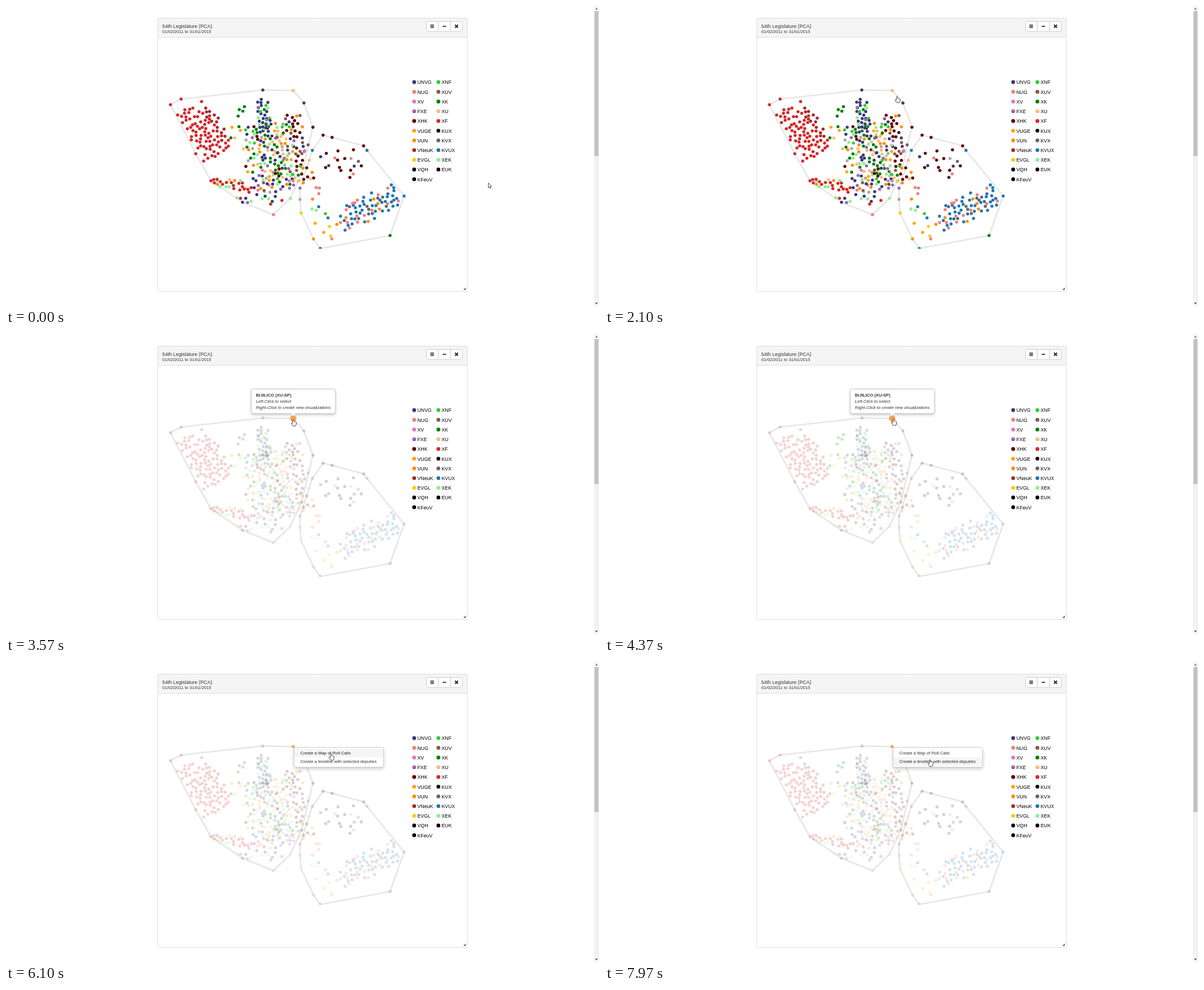
An HTML page with a canvas for the animation above (8000 ms loop, 1053x532 px).

```html
<!DOCTYPE html>
<html lang="en">
<head>
<meta charset="utf-8">
<title>Legislature scatter plot</title>
<style>
html, body { margin: 0; width: 100%; height: 100%; overflow: hidden; background: #fff; }
canvas { display: block; width: 1053px; height: 532px; }
</style>
</head>
<body>
<canvas id="stage" width="1053" height="532"></canvas>
<script>
const ctx = document.getElementById('stage').getContext('2d');
const LOOP = 8000, STEP = 1000 / 15, TAU = Math.PI * 2;
const FACE = '"Liberation Sans", Arial, sans-serif';
const SMALL = 7.67, LARGE = 8.77, DOT = 2.75, GAP = 5.2;

const color = {
  navy: '#393b79', coral: '#f08080', pink: '#e377c2', violet: '#9467bd', maroon: '#600000',
  amber: '#ffa500', orange: '#ff8c00', brown: '#a52a2a', yellow: '#ffcc00', black: '#000',
  lime: '#32cd32', umber: '#8c564b', green: '#008000', peach: '#ffbb78', red: '#d62728',
  slate: '#666', blue: '#1f77b4', mint: '#90ee90', gray: '#aaa'
};

const legend = [
  'UNVG navy, NUG coral, XV pink, FXE violet, XHK maroon, VUGE amber, VUN orange, VNeuK brown, EVGL yellow, VQH black, KFeuV black',
  'XNF lime, XUV umber, XK green, XU peach, XF red, KUX black, KVX slate, KVUX blue, XEK mint, EUK black'
].map(column => column.split(', ').map(item => item.split(' ')));

// Hull corners; each one is also a dot
const hulls = [
  { keys: 'red red navy peach navy maroon maroon mint pink navy red red',
    points: [[292,175], [311,165], [456,149], [510,150], [529,172], [545,215], [525,298],
             [505,341], [475,370], [420,348], [364,310], [337,262]] },
  { keys: 'maroon maroon maroon blue blue green blue orange yellow gray violet blue',
    points: [[563,229], [579,233], [635,248], [641,256], [707,337], [682,407], [558,430],
             [546,413], [524,367], [522,343], [522,323], [544,256]] }
];

// Groups of dots strewn around an axis, densest along it
const groups = [
  { axis: [[320,180], [376,264]], spread: 32, mix: { red: 74 } },
  { axis: [[356,180], [390,245]], spread: 12, mix: { brown: 13 } },
  { axis: [[366,312], [436,322]], spread: 11, mix: { red: 17, mint: 5, peach: 2, orange: 2 } },
  { axis: [[452,165], [462,225]], spread: 13, mix: { navy: 22, green: 5, mint: 4, violet: 3, lime: 3 } },
  { axis: [[422,178], [398,242]], spread: 12, mix: { green: 6, peach: 1, amber: 1 } },
  { axis: [[458,208], [486,328]], spread: 52,
    mix: { navy: 29, green: 26, mint: 19, peach: 18, orange: 14, violet: 12, gray: 11,
           maroon: 11, lime: 9, amber: 9, umber: 8, pink: 4, coral: 2 } },
  { axis: [[506,192], [532,312]], spread: 19, mix: { maroon: 18, umber: 8, orange: 4, navy: 4, peach: 3, pink: 1 } },
  { axis: [[408,339], [500,349]], spread: 11, mix: { navy: 4, mint: 4, red: 3, violet: 1 } },
  { axis: [[562,254], [642,290]], spread: 30, mix: { maroon: 11, navy: 3, coral: 2, gray: 1, slate: 1 } },
  { axis: [[545,322], [572,416]], spread: 34, mix: { coral: 4, orange: 2, amber: 2, yellow: 2, mint: 2, blue: 2, lime: 1 } },
  { axis: [[594,386], [694,332]], spread: 26, mix: { blue: 42, coral: 15, slate: 8, orange: 5 } }
];

let seed = 54;
function random() {
  seed = (seed * 1664525 + 1013904223) % 4294967296;
  return seed / 4294967296;
}

function outline(points) {
  const path = new Path2D();
  points.forEach(p => path.lineTo(...p));
  path.closePath();
  return path;
}

const dots = [];
function addDot(key, x, y) { dots.push({ fill: color[key], x, y, order: random() }); }

function strew([[x1, y1], [x2, y2]], spread) {
  const dx = x2 - x1, dy = y2 - y1;
  const u = random(), off = (random() - random()) * spread / Math.hypot(dx, dy);
  return [x1 + dx * u - dy * off, y1 + dy * u + dx * off];
}

const isFree = ([x, y]) => hulls.some(h => ctx.isPointInPath(h.path, x, y)) &&
  dots.every(d => Math.hypot(d.x - x, d.y - y) > GAP);

for (const hull of hulls) {
  hull.path = outline(hull.points);
  hull.keys.split(' ').forEach((key, i) => addDot(key, ...hull.points[i]));
}
for (const { axis, spread, mix } of groups) {
  for (const key in mix) {
    for (let i = 0; i < mix[key]; i++) {
      let p = strew(axis, spread);
      for (let tries = 0; tries < 10 && !isFree(p); tries++) p = strew(axis, spread);
      addDot(key, ...p);
    }
  }
}
dots.sort((a, b) => a.order - b.order);

const first = { x: 529, y: 172, name: 'TÚLIO VANZ (UNVG-MS)' };
const second = { x: 510, y: 150, name: 'BIJILICO (XU-SP)' };

// Pointer stops, each reached between two times
const stops = [
  { from: 0, to: 1, x: 532, y: 173 },
  { from: 1633, to: 2500, x: 510, y: 151 },
  { from: 3703, to: 3840, x: 515, y: 151 },
  { from: 4103, to: 4440, x: 512, y: 150 },
  { from: 5503, to: 6100, x: 577, y: 162 },
  { from: 6633, to: 6970, x: 577, y: 177 },
  { from: 7833, to: 7970, x: 577, y: 173 }
];

const handShape = new Path2D('M-1 1Q0-.8 1 1L1 4Q2.2 3.4 2.6 4.4Q3.8 3.9 4.1 5Q5.6 4.7 5.6 6.2L5.4 9L4.4 12L-.6 12L-3.3 7.8Q-3.6 6-2.2 6.4L-1 7.6Z');
const arrowShape = new Path2D('M0 0L0 8.5L2 6.7L3.4 9.8L4.8 9.2L3.4 6.2L6 6.2Z');

const ramp = (t, a, b) => Math.min(1, Math.max(0, (t - a) / (b - a)));
const ease = u => u * u * (3 - 2 * u);

function text(str, x, y, size, style = '', fill = '#333') {
  ctx.font = `${style} ${size}px ${FACE}`;
  ctx.fillStyle = fill;
  ctx.fillText(str, x, y);
}

function disc(x, y, r, fill) {
  ctx.fillStyle = fill;
  ctx.beginPath();
  ctx.arc(x, y, r, 0, TAU);
  ctx.fill();
}

function bar(x, y, w, h, fill) {
  ctx.fillStyle = fill;
  ctx.fillRect(x, y, w, h);
}

function box(x, y, w, h, r, fill, stroke) {
  ctx.beginPath();
  ctx.roundRect(x, y, w, h, r);
  ctx.fillStyle = fill;
  ctx.fill();
  if (stroke) {
    ctx.shadowColor = 'transparent';
    ctx.strokeStyle = stroke;
    ctx.lineWidth = 1;
    ctx.stroke();
  }
}

function polygon(points, fill) {
  ctx.fillStyle = fill;
  ctx.fill(outline(points));
}

// Triangle with a base of 2 * half around x; negative height points up
const wedge = (x, y, half, height, fill) =>
  polygon([[x - half, y], [x, y + height], [x + half, y]], fill);

function shadow(blur, y) {
  ctx.shadowColor = 'rgba(0,0,0,.22)';
  ctx.shadowBlur = blur;
  ctx.shadowOffsetY = y;
}

function drawPanel() {
  box(269.5, 21.5, 550, 485, 2.5, '#fff', '#ddd');
  box(270, 22, 549, 33.5, [2, 2, 0, 0], '#f5f5f5');
  bar(270, 55, 549, 1, '#ddd');
  text('54th Legislature (PCA)', 277.5, 39, LARGE);
  text('01/02/2011 to 31/01/2015', 277.5, 48.3, SMALL);

  box(746.5, 27.5, 64, 17.5, 2, '#fff', '#ccc');
  for (const x of [767, 789]) bar(x, 28, 1, 17, '#ccc');
  for (let i = 0; i < 3; i++) bar(753.5, 33 + i * 2.3, 6.5, 1.3, '#222');
  bar(775.5, 35.3, 6, 1.7, '#222');
  ctx.strokeStyle = '#222';
  ctx.lineWidth = 2;
  for (const d of [-2.7, 2.7]) {
    ctx.beginPath();
    ctx.moveTo(800 - d, 33.2);
    ctx.lineTo(800 + d, 38.6);
    ctx.stroke();
  }
  polygon([[816.5, 499], [816.5, 503.5], [812, 503.5]], '#666');
}

function drawScrollbar() {
  bar(1044, 0, 9, 532, '#f1f1f1');
  bar(1045, 9, 7, 257, '#c1c1c1');
  wedge(1048.5, 6, 2.5, -2.5, '#777');
  wedge(1048.5, 526, 2.5, 2.5, '#444');
}

function drawLegend() {
  legend.forEach((column, c) => column.forEach(([name, key], row) => {
    const y = 135.2 + row * 17.22, x = 724.8 + c * 43;
    disc(x, y - 0.2, 3.4, color[key]);
    text(name, x + 5.7, y + 3.2, LARGE, '', '#000');
  }));
}

function drawPlot(t) {
  const chosen = t >= 3570;
  ctx.save();
  ctx.beginPath();
  ctx.rect(270, 56, 549, 374.5);
  ctx.clip();
  ctx.strokeStyle = '#e6e6e6';
  ctx.lineWidth = 2.7;
  ctx.lineJoin = 'round';
  for (const hull of hulls) ctx.stroke(hull.path);
  ctx.globalAlpha = chosen ? 0.2 : 1;
  for (const d of dots) disc(d.x, d.y, DOT, d.fill);
  ctx.globalAlpha = 1;
  if (t >= 500 && t < 2000) disc(first.x, first.y, DOT + 3 * (1 - ramp(t, 1880, 2000)), color.navy);
  const grow = ramp(t, 2370, 2570) - ramp(t, 5640, 5770);
  disc(second.x, second.y, DOT + 3 * grow, chosen ? '#fba254' : color.peach);
  ctx.restore();
}

function drawTooltip(node, alpha) {
  if (alpha <= 0) return;
  const x = node.x - 75, y = node.y - 53, bottom = y + 44;
  ctx.save();
  ctx.globalAlpha = alpha;
  shadow(5, 2.5);
  box(x + 0.5, y + 0.5, 149.5, 43.5, 3.3, '#fff', '#c4c4c4');
  wedge(node.x, bottom, 5.5, 5.5, '#bbb');
  wedge(node.x, bottom - 0.6, 5, 5.1, '#fff');
  text(node.name, x + 8.8, y + 14, SMALL, 'bold');
  text('Left-Click to select', x + 8.8, y + 25, SMALL, 'italic');
  text('Right-Click to create new visualizations', x + 8.8, y + 36, SMALL, 'italic');
  ctx.restore();
}

function drawMenu(tip) {
  ctx.save();
  shadow(6, 3);
  box(511.5, 151.5, 159, 35, 2.5, '#fff', '#ccc');
  ctx.restore();
  ['Create a Map of Roll Calls', 'Create a timeline with selected deputies'].forEach((label, i) => {
    const top = 154 + i * 15;
    const hover = tip.x > 512 && tip.y >= top && tip.y < top + 15;
    if (hover) bar(512, top, 158, 15, '#f5f5f5');
    text(label, 522.7, top + 10, SMALL, '', hover ? '#262626' : '#333');
  });
}

function pointerAt(t) {
  let { x, y } = stops[0];
  for (const stop of stops) {
    const u = ease(ramp(t, stop.from, stop.to));
    x += (stop.x - x) * u;
    y += (stop.y - y) * u;
  }
  return { x, y };
}

function drawPointer(shape, x, y) {
  ctx.save();
  ctx.translate(x, y);
  ctx.fillStyle = '#fff';
  ctx.fill(shape);
  ctx.strokeStyle = '#222';
  ctx.lineWidth = 0.8;
  ctx.lineJoin = 'round';
  ctx.stroke(shape);
  ctx.restore();
}

function draw(now) {
  const t = now % LOOP;
  // The pointer advances at 15 steps per second
  const tip = pointerAt(Math.floor((t + 35) / STEP) * STEP);
  bar(0, 0, 1053, 532, '#fff');
  drawScrollbar();
  drawPanel();
  drawPlot(t);
  drawLegend();
  if (t >= 500) drawTooltip(first, 1 - ramp(t, 1880, 2000));
  drawTooltip(second, ramp(t, 2300, 2500) - ramp(t, 5640, 5770));
  if (t >= 5300) drawMenu(tip);
  if (t < 500) drawPointer(arrowShape, 856.5, 313.8);
  else drawPointer(handShape, tip.x, tip.y);
  requestAnimationFrame(draw);
}
draw(performance.now());
</script>
</body>
</html>
```
